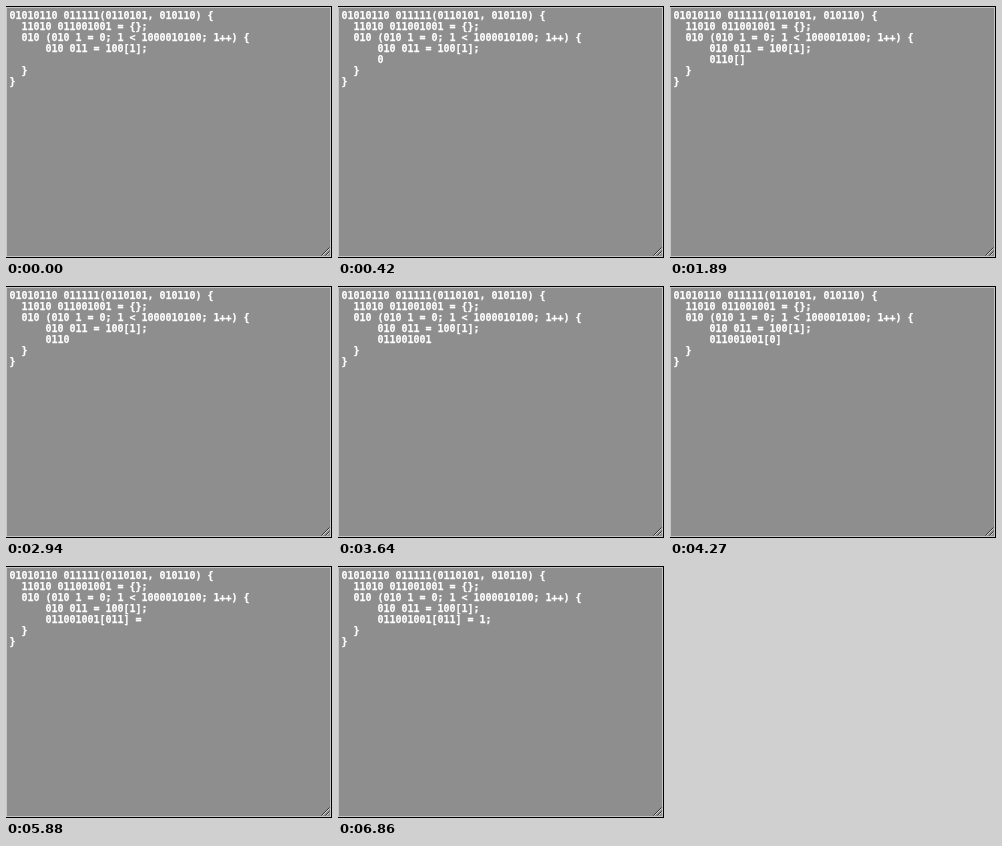
An HTML page that plays this animation: 326 by 252 pixels, repeating every 8 s.

```html
<!DOCTYPE html>
<html lang="en">
<head>
<meta charset="utf-8">
<title>Typing code</title>
<style>
  html, body { margin: 0; width: 100%; height: 100%; overflow: hidden; background: #8e8e8e; }
  svg { display: block; width: 326px; height: 252px; }
  text {
    font: bold 10px "DejaVu Sans Mono", monospace;
    letter-spacing: -.02px;
    fill: #fff;
    stroke: #fff;
    stroke-width: .25px;
    white-space: pre;
  }
</style>
</head>
<body>
<svg viewBox="0 0 326 252">
  <rect width="326" height="252"/>
  <rect x=".5" y="1.5" width="324" height="249" fill="#8e8e8e" stroke="#c4c4c4" shape-rendering="crispEdges"/>
  <g fill="none">
    <path d="M315.5 249.5l8-8M319.5 249.5l4-4" stroke="#303030"/>
    <path d="M316.5 249.5l7-7M320.5 249.5l3-3" stroke="#d8d8d8"/>
  </g>
  <g id="code"></g>
</svg>
<script>
const LOOP = 8000, LEFT = 3.5, BASELINE = 13, LEADING = 11, TYPED_ROW = 4;

const lines = [
  "01010110 011111(0110101, 010110) {",
  "  11010 011001001 = {};",
  "  010 (010 1 = 0; 1 < 1000010100; 1++) {",
  "      010 011 = 100[1];",
  "",
  "  }",
  "}"
];

// [start in ms, text on the typed row]; brackets close themselves
const steps = [
  [0, ""], [420, "0"], [490, "01"], [560, "011"], [700, "0110"],
  [1890, "0110[]"], [2940, "0110"],
  [3080, "01100"], [3290, "011001"], [3430, "0110010"],
  [3570, "01100100"], [3640, "011001001"],
  [3990, "011001001[]"], [4270, "011001001[0]"],
  [4410, "011001001[01]"], [4550, "011001001[011]"],
  [5880, "011001001[011] ="], [6300, "011001001[011] = 1"],
  [6860, "011001001[011] = 1;"]
];

const code = document.getElementById("code");
const rows = lines.map((line, i) => {
  const row = document.createElementNS("http://www.w3.org/2000/svg", "text");
  row.setAttribute("x", LEFT);
  row.setAttribute("y", BASELINE + i * LEADING);
  row.textContent = line;
  return code.appendChild(row);
});

const typed = rows[TYPED_ROW];
const start = performance.now();

function draw(now) {
  const t = Math.max(0, now - start) % LOOP;
  const text = "      " + steps.findLast(([at]) => at <= t)[1];
  if (typed.textContent !== text) typed.textContent = text;
  requestAnimationFrame(draw);
}
draw(start);
</script>
</body>
</html>
```
